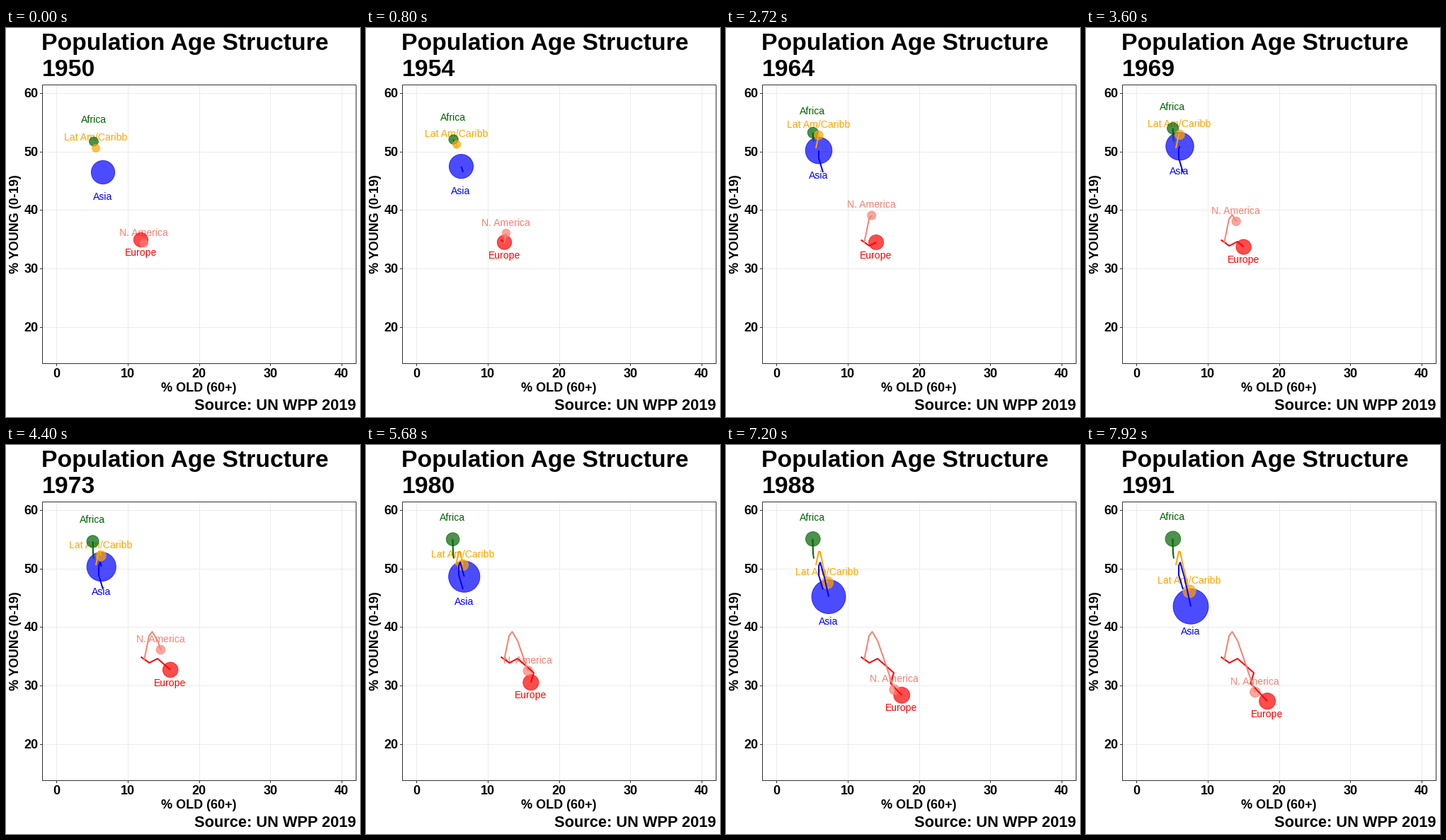
These frames come from a looping animation (500 px wide and 550 px high, 8 s). A matplotlib script:

```python
import numpy as np
import matplotlib.pyplot as plt
from matplotlib.animation import FuncAnimation
from matplotlib.patches import Circle, Rectangle

W, H, DPI = 500, 550, 100
FRAMES, INTERVAL = 100, 80
STEPS = 12  # frames per five-year step
PT = 72 / DPI

plt.rcParams["font.family"] = "Liberation Sans"
fig = plt.figure(figsize=(W / DPI, H / DPI), dpi=DPI, facecolor="white")
ax = fig.add_axes([0, 0, 1, 1])
ax.set(xlim=(0, W), ylim=(H, 0))
ax.axis("off")

LEFT, RIGHT, TOP, BOTTOM = 51, 494, 80, 474


def text(x, y, s, px, ha="center", va="baseline", weight="bold", **kw):
    return ax.text(x, y, s, fontsize=px * PT, ha=ha, va=va, weight=weight, **kw)


def line(xs, ys, color, px=1, **kw):
    return ax.plot(xs, ys, color=color, lw=px * PT, **kw)[0]


for value in range(0, 50, 10):
    x = 71 + 10.075 * value
    line([x, x], [TOP, BOTTOM], "#ebebeb", zorder=0)
    line([x, x], [BOTTOM, BOTTOM + 3], "#333333", zorder=0)
    text(x, 494, str(value), 18)
for value in range(20, 70, 10):
    y = 92 + 8.265 * (60 - value)
    line([LEFT, RIGHT], [y, y], "#ebebeb", zorder=0)
    line([LEFT - 3, LEFT], [y, y], "#333333", zorder=0)
    text(46, y + 6, str(value), 18, ha="right")
ax.add_patch(Rectangle((LEFT, TOP), RIGHT - LEFT, BOTTOM - TOP, fill=False,
                       ec="#333333", lw=PT, zorder=9))

text(50.5, 31.5, "Population Age Structure", 33.8, ha="left")
year_text = text(50.5, 68, "", 33.8, ha="left")
text(272, 514.5, "% OLD (60+)", 18)
text(14, 277, "% YOUNG (0-19)", 18, va="center", rotation=90)
text(494, 540.5, "Source: UN WPP 2019", 21.8, ha="right")


class Region:
    """A bubble with its label, moving straight between turning points."""

    def __init__(self, name, color, radii, label_dy, turns, order):
        self.radii, self.dy = radii, label_dy
        self.steps, self.xs, self.ys = np.array(turns).T
        self.label = text(0, 0, name, 14, weight="normal", color=color, zorder=2)
        self.bubble = ax.add_patch(Circle((0, 0), 1, fc=color, ec=color, lw=PT,
                                          alpha=0.7, zorder=3 + order / 10))
        self.trail = line([], [], color, 2, zorder=4 + order / 10,
                          solid_capstyle="butt", solid_joinstyle="round")

    def update(self, step, growth):
        x = np.interp(step, self.steps, self.xs)
        y = np.interp(step, self.steps, self.ys)
        passed = self.steps <= step
        self.trail.set_data(np.append(self.xs[passed], x),
                            np.append(self.ys[passed], y))
        first, last = self.radii
        self.bubble.center = x, y
        self.bubble.radius = first + (last - first) * growth
        self.label.set_position((x - 0.4, y + self.dy + 4.7))


# Turning points: five-year step, then stage position.
regions = [
    Region("Africa", "darkgreen", (6.4, 10.8), -31,
           [(0, 124, 160.5), (2, 123, 153.5), (5, 122.5, 133.5),
            (9, 123, 132.5)], 0),
    Region("Asia", "blue", (16.6, 24.9), 34.7,
           [(0, 137, 204), (2, 131, 184), (3, 131, 171), (4, 133, 166),
            (6, 139, 187), (9, 151, 242)], 1),
    Region("Europe", "red", (10.1, 11.5), 18,
           [(0, 190.5, 299.5), (2, 202.5, 308), (3, 214, 302), (5, 237, 322),
            (6, 232.5, 337), (9, 264, 370.5)], 2),
    Region("Lat Am/Caribb", "orange", (5.4, 9), -15.4,
           [(0, 127, 170), (3, 131, 150.5), (4, 133, 151), (6, 137, 170.5),
            (9, 149, 219)], 3),
    Region("N. America", "salmon", (5.6, 7.2), -15.2,
           [(0, 195, 304.5), (2, 202, 270), (3, 206.5, 264), (4, 214, 276.5),
            (7, 237, 343.5), (9, 240, 353)], 4),
]


def update(frame):
    year_text.set_text(str(round(1950 + frame * 5 / STEPS)))
    growth = (frame / (FRAMES - 1)) ** 1.25
    for region in regions:
        region.update(frame / STEPS, growth)
    return []


anim = FuncAnimation(fig, update, frames=FRAMES, interval=INTERVAL,
                     repeat=True, repeat_delay=0, blit=False)
plt.show()
```
